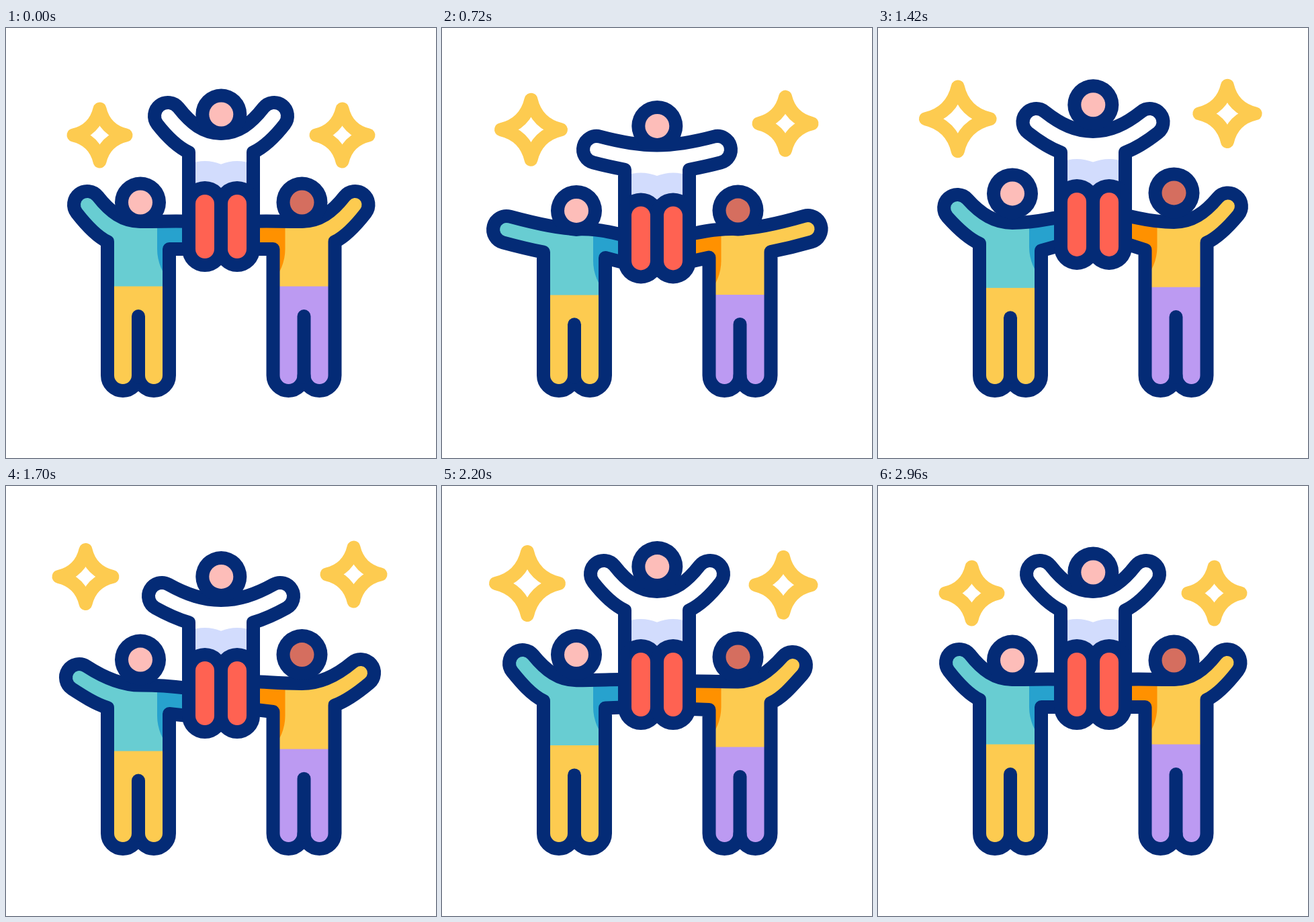
An HTML page with a canvas that plays this animation: 640x640 px, repeating every 3.6 s.

```html
<!DOCTYPE html>
<html lang="en">
<head>
<meta charset="utf-8">
<title>Cheer pyramid</title>
<style>
  html, body { margin: 0; width: 100%; height: 100%; overflow: hidden; background: #fff; }
  canvas { display: block; width: 640px; height: 640px; }
</style>
</head>
<body>
<canvas id="stage"></canvas>
<script>
const LOOP = 3600, LAG = 70, RAD = Math.PI / 180;
const INK = '#042b76', PINK = '#fdbdb9', YELLOW = '#fdcb50';

const canvas = document.getElementById('stage');
const ctx = canvas.getContext('2d');
const dpr = window.devicePixelRatio || 1;
canvas.width = canvas.height = 640 * dpr;

// Smooth curve through keys that never overshoots them.
function track(times, values) {
  const last = times.length - 1;
  const rate = i => (values[i + 1] - values[i]) / (times[i + 1] - times[i]);
  const slopes = times.map((_, i) => {
    if (i === 0 || i === last) return 0;
    const a = rate(i - 1), b = rate(i);
    return a * b <= 0 ? 0 : 2 * a * b / (a + b);
  });
  return t => {
    if (t <= times[0]) return values[0];
    if (t >= times[last]) return values[last];
    let i = 0;
    while (t > times[i + 1]) i++;
    const h = times[i + 1] - times[i], u = (t - times[i]) / h, v = 1 - u;
    return values[i] * v * v * (1 + 2 * u) + values[i + 1] * u * u * (3 - 2 * u)
      + h * u * v * (slopes[i] * v - slopes[i + 1] * u);
  };
}

function tracks(times, rows) {
  const made = Object.entries(rows).map(([name, values]) => [name, track(times, values)]);
  return t => Object.fromEntries(made.map(([name, f]) => [name, f(t)]));
}

const topPose = tracks([0, 440, 560, 720, 1080, 1150, 1640, 1700, 2140, 2200, 2600], {
  body: [0, 21, 23, 17.5, -24, -26, 13.5, 13, 0, 0, 0],
  head: [0, 21.5, 23.5, 17.5, -40, -43.5, 7, 6.5, -10, -8.5, 0],
  tipX: [0, -15, -15, -11, 0, 0, -9.5, -9, 0, 0, 0],
  tipY: [0, 35, 36.5, 32.5, 1, 0, 21, 20, 0, 0, 0]
});

const sidePose = tracks(
  [0, 370, 440, 650, 685, 720, 1010, 1080, 1200, 1630, 1700, 1800, 2130, 2200, 2330, 2630], {
  waist: [0, 6, 7, 12.5, 13.5, 13, 7, 3, 0, 7, 10, 11.5, 4, 1.5, 0, 0],
  head: [0, 0.5, 3.5, 12, 13, 12.5, -7.5, -13, -15, -8.5, -1, 4, -5, -8.5, -7, 0],
  tipX: [121, 108.5, 104, 96, 95, 96, 116.5, 119, 121, 112.5, 109, 107, 118.5, 120, 121, 121],
  tipY: [263, 274, 282, 299, 300.5, 300, 270, 266, 263, 278, 285, 290, 267, 264, 263, 263],
  angle: [52, 33, 28, 16, 14, 15, 47, 50, 52, 40, 33, 29, 48, 51, 52, 52],
  hand: [0, 3, 7, 17, 19, 18.5, -7, -7.5, -8, 4, 12, 14, 3, 0.5, 0, 0]
});

const starLeft = {
  move: track([0, 440, 720, 1080, 1550, 1700, 2200, 2960], [0, 2, 7, 15, 21.5, 21, 12.5, 0]),
  size: track([160, 440, 580, 720, 980, 1080, 1390, 1700, 1790, 2210, 2610],
    [49, 54.5, 56.5, 54.5, 49, 50, 58, 50, 49, 57, 49])
};
const starRight = {
  move: track([0, 440, 720, 1080, 1390, 1700, 2200, 2960], [0, 5, 10.5, 17, 19.5, 17, 7.5, 0]),
  size: track([0, 330, 440, 720, 1080, 1170, 1600, 1700, 1970, 2200, 2380],
    [49, 56, 54.5, 49.5, 54, 56, 49, 50, 56, 51.5, 49])
};

function outline(path, color = INK, width = 20) {
  ctx.strokeStyle = color;
  ctx.lineWidth = width;
  ctx.stroke(path);
}

function bar(x, y1, y2, width, color) {
  const p = new Path2D();
  p.moveTo(x, y1);
  p.lineTo(x, y2);
  ctx.lineCap = 'round';
  outline(p, color, width);
  ctx.lineCap = 'butt';
}

function disc(x, y, r, color) {
  ctx.fillStyle = color;
  ctx.beginPath();
  ctx.arc(x, y, r, 0, 7);
  ctx.fill();
}

function head(x, y, skin) {
  disc(x, y, 38, INK);
  disc(x, y, 18, skin);
}

function mirrored(axis, draw) {
  ctx.save();
  ctx.translate(2 * axis, 0);
  ctx.scale(-1, 1);
  draw();
  ctx.restore();
}

// Raised arm: from the neck, around the hand, back to the armpit.
function arm(p, neckX, neckY, x, y, deg, pitX, pitY) {
  const a = deg * RAD, c = Math.cos(a), s = Math.sin(a);
  const topX = x + 20 * s, topY = y - 20 * c;
  const lowX = x - 20 * s, lowY = y + 20 * c;
  const k = 0.4 * Math.hypot(neckX - topX, neckY - topY);
  const end = (0.4 * deg + 5) * RAD;
  p.bezierCurveTo(neckX - 26, neckY, topX + k * c, topY + k * s, topX, topY);
  p.arc(x, y, 20, a - Math.PI / 2, a - 3 * Math.PI / 2, true);
  p.bezierCurveTo(lowX + 20 * c, lowY + 20 * s,
    pitX - 20 * Math.cos(end), pitY - 20 * Math.sin(end), pitX, pitY);
}

function sideFigure(pose, lift, look) {
  const { waist } = pose;
  const neck = 288 + 0.85 * waist, hand = 288 + pose.hand;
  const reach = (hand - neck) * 0.4;
  const p = new Path2D();
  p.moveTo(275, hand + reach);
  p.bezierCurveTo(255, hand - 1, 238, neck, 200, neck);
  arm(p, 200, neck, pose.tipX, pose.tipY, pose.angle, 151, 318 + 1.2 * waist);
  p.lineTo(151, 517);
  p.arc(174, 517, 23, Math.PI, 0, true);
  p.arc(220, 517, 23, Math.PI, 0, true);
  p.lineTo(243, 329 + waist);
  p.lineTo(275, hand + 41 + reach);

  ctx.save();
  ctx.clip(p);
  ctx.fillStyle = look.shirt;
  ctx.fillRect(0, 0, 640, 640);
  bar(296, 262 + lift, 329 + lift, 142, look.shade);
  ctx.fillStyle = look.trousers;
  ctx.fillRect(0, 384.5 + waist, 640, 300);
  ctx.restore();
  outline(p);
  bar(197, 429 + 0.95 * waist, 520, 20, INK);
  head(200, 259.5 + pose.head, look.skin);
}

function topHalf(pose) {
  const { body } = pose, bend = pose.tipY / 35;
  const p = new Path2D();
  p.moveTo(320, 157 + body);
  arm(p, 320, 157 + body, 241 + pose.tipX, 131 + body + pose.tipY,
    52 - 40 * bend, 272, 185 + body + 9 * bend);
  p.lineTo(272, 295 + body);

  const area = new Path2D(p);
  area.lineTo(320, 295 + body);
  ctx.fillStyle = '#fff';
  ctx.fill(area);

  ctx.save();
  ctx.beginPath();
  ctx.rect(272, 100, 48, 162 + body);
  ctx.clip();
  disc(296, 262 + body, 64, '#d2dcfd');
  ctx.restore();
  outline(p);
}

function topFigure(pose) {
  const { body } = pose;
  topHalf(pose);
  mirrored(320, () => topHalf(pose));
  for (const [width, color] of [[68, INK], [28, '#ff6252']])
    for (const x of [296, 344]) bar(x, 262 + body, 329 + body, width, color);
  head(320.3, 128.5 + pose.head, PINK);
}

function star(x, y, half) {
  const r = half - 10, q = r * 0.19;
  const p = new Path2D();
  p.moveTo(x, y - r);
  p.quadraticCurveTo(x + q, y - q, x + r, y);
  p.quadraticCurveTo(x + q, y + q, x, y + r);
  p.quadraticCurveTo(x - q, y + q, x - r, y);
  p.quadraticCurveTo(x - q, y - q, x, y - r);
  p.closePath();
  outline(p, YELLOW);
}

const leftLook = { shirt: '#68cdd2', shade: '#27a2ce', trousers: YELLOW, skin: PINK };
const rightLook = { shirt: YELLOW, shade: '#ff9100', trousers: '#bc9af2', skin: '#d56e5f' };

function draw(t) {
  ctx.setTransform(dpr, 0, 0, dpr, 0, 0);
  ctx.fillStyle = '#fff';
  ctx.fillRect(0, 0, 640, 640);
  ctx.lineJoin = 'round';

  const top = topPose(t);
  sideFigure(sidePose(t), top.body, leftLook);
  mirrored(320.25, () => sideFigure(sidePose(t - LAG), top.body, rightLook));
  topFigure(top);

  const dl = starLeft.move(t), dr = starRight.move(t);
  star(139.5 - dl, 159.5 - 1.165 * dl, starLeft.size(t));
  star(500.5 + dr, 159.5 - 1.65 * dr, starRight.size(t));
}

const start = performance.now();
function tick() {
  draw((performance.now() - start) % LOOP);
  requestAnimationFrame(tick);
}
tick();
</script>
</body>
</html>
```
